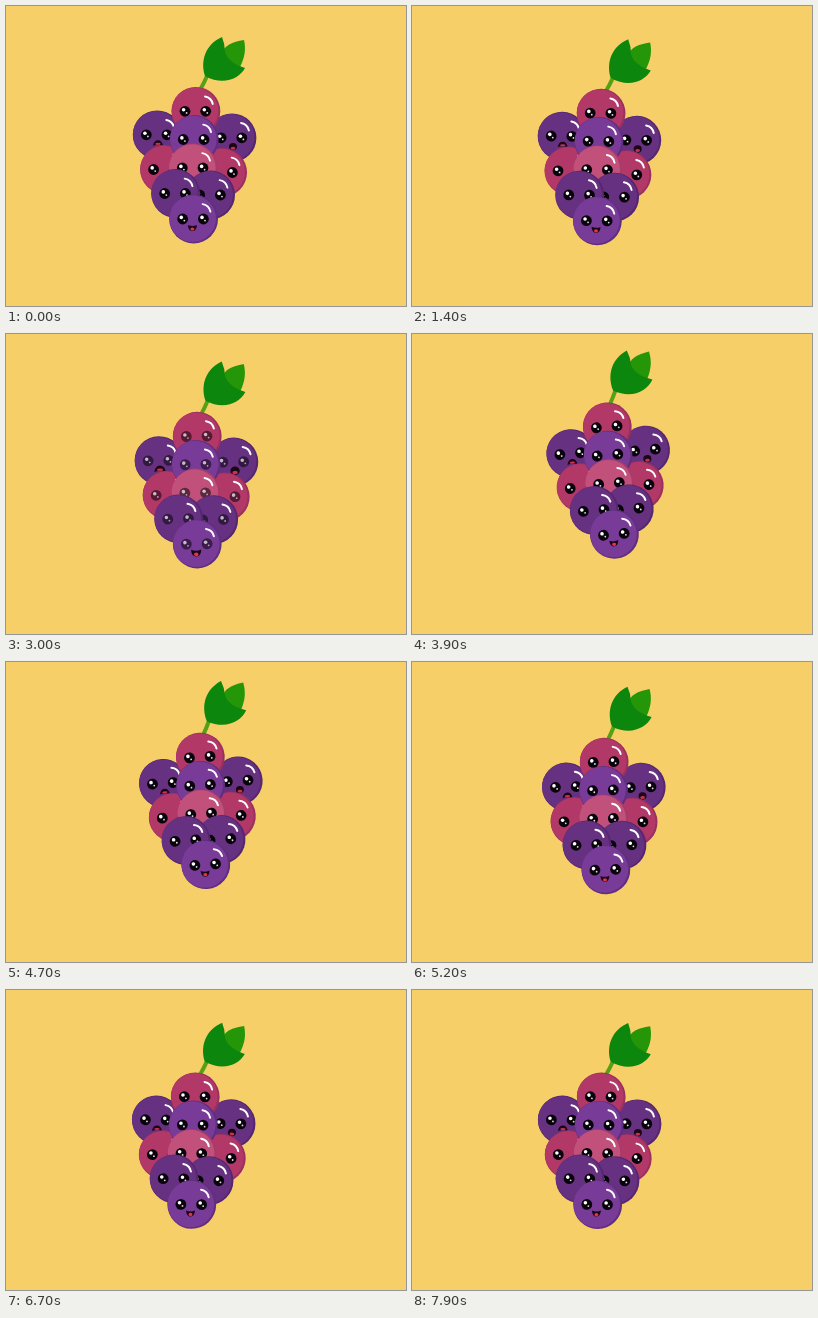
Animation of 400 by 300 pixels, one loop 8 s. Source, as an HTML page with a canvas:

```html
<!DOCTYPE html>
<html lang="en">
<head>
<meta charset="utf-8">
<title>Swinging grapes</title>
<style>
html, body { margin: 0; width: 100%; height: 100%; overflow: hidden; background: #f7cf68; }
canvas { display: block; }
</style>
</head>
<body>
<canvas id="stage" width="400" height="300"></canvas>
<script>
const ctx = document.getElementById('stage').getContext('2d');
const LOOP = 8000, STEP = 100, SWING = 6000;
const REST = 0.13; // swing amount at which the artwork is laid out
const PIVOT = [218, 45];
const RADIUS = 24.4;

// [time, swing amount], one period
const SWING_KEYS = [[0, .13], [650, .03], [1300, 0], [1900, .02], [2500, .13], [3000, .34],
  [3500, .76], [3900, .98], [4250, 1.04], [4700, .83], [5250, .46], [5800, .18], [6000, .13]];

const PINK = ['#b23867', '#99305f'];
const ROSE = ['#c1507a', '#a83c68'];
const PLUM = ['#673181', '#55276f'];
const VIOLET = ['#783b97', '#602e80'];

// x, y, colours, mouth; back to front
const GRAPES = [
  [151.2, 128.8, PLUM, 'sad'],
  [226, 131.8, PLUM, 'round'],
  [158.5, 163.5, PINK],
  [216.6, 166.5, PINK],
  [189.9, 105.3, PINK],
  [188.2, 133.5, VIOLET],
  [187.2, 162, ROSE],
  [204.6, 189, PLUM],
  [169.6, 187.5, PLUM],
  [187.6, 213, VIOLET, 'smile']
];
const MOUTH_AT = { sad: [0.8, 8.5], round: [1, 8.8], smile: [-1.2, 8] };

// Smooth curve through the keys
function swingAt(time) {
  const keys = SWING_KEYS, last = keys.length - 1;
  let i = 0;
  while (i < last - 1 && time >= keys[i + 1][0]) i++;
  const slope = k => {
    const a = keys[Math.max(0, k - 1)], b = keys[Math.min(last, k + 1)];
    return (b[1] - a[1]) / (b[0] - a[0]);
  };
  const [t0, v0] = keys[i], [t1, v1] = keys[i + 1];
  const span = t1 - t0, u = (time - t0) / span, ease = u * u * (3 - 2 * u);
  return v0 + (v1 - v0) * ease
    + span * u * (1 - u) * ((1 - u) * slope(i) - u * slope(i + 1));
}

function disc(x, y, r, color, ry = r) {
  ctx.fillStyle = color;
  ctx.beginPath();
  ctx.ellipse(x, y, r, ry, 0, 0, Math.PI * 2);
  ctx.fill();
}

function shape(path, color) {
  ctx.fillStyle = color;
  ctx.fill(new Path2D(path));
}

function eye(x, blink) {
  ctx.globalAlpha = 1 - 0.45 * blink;
  disc(x, 0, 5.4, '#09040c');
  ctx.globalAlpha = 1 - 0.3 * blink;
  disc(x - 1.4, -1.6, 1.8, '#fff');
  disc(x + 1.6, 1.6, 0.9, '#e6d8ea');
  ctx.globalAlpha = 1;
}

function mouth(kind, open) {
  ctx.save();
  ctx.translate(...MOUTH_AT[kind]);
  ctx.scale(open, open);
  if (kind === 'smile') {
    shape('M-4.5 -2 Q0 0 4.5 -2 Q4 4 0 4 Q-4 4 -4.5 -2Z', '#1a0614');
    disc(0, 2, 2, '#e0344a', 1.6);
  } else if (kind === 'sad') {
    shape('M-5 2.5 Q-4 -3 0 -3 Q4 -3 5 2.5 Q0 0.5 -5 2.5Z', '#1a0614');
    disc(0, 0.6, 2.7, '#c8304c', 1.1);
  } else {
    disc(0, 0, 4, '#1a0614', 3.7);
    disc(0, 1.6, 2.4, '#c8304c', 1.5);
  }
  ctx.restore();
}

function grape([x, y, [fill, shade], kind], blink) {
  ctx.save();
  ctx.translate(x, y);
  disc(0, 0, RADIUS, shade);
  disc(-0.9, -0.4, RADIUS - 1.1, fill);
  ctx.strokeStyle = '#fff';
  ctx.lineWidth = 2;
  ctx.lineCap = 'round';
  ctx.beginPath();
  ctx.arc(7.5, -5.5, 9.5, -1.4, -0.2);
  ctx.stroke();
  eye(-10.9, blink);
  eye(9.8, blink);
  if (kind) mouth(kind, 1 + 0.15 * blink);
  ctx.restore();
}

function leaf() {
  ctx.strokeStyle = '#55a014';
  ctx.lineWidth = 4;
  ctx.lineCap = 'butt';
  ctx.stroke(new Path2D('M193.5 85 Q198 77 202 68'));
  shape('M216 48 C218 39 226 36 238 34 C240 43 239 51 234 61 L220 60Z', '#259608');
  shape('M199 70 C194 54 200 38 216 31 Q219 38 219 46 C222 55 230 59 239 62 C233 73 217 80 199 70Z', '#0c860c');
}

function draw(now) {
  const time = Math.floor(now % LOOP / STEP) * STEP;
  const swing = swingAt(time % SWING) - REST;
  const blink = Math.max(0, 1 - Math.abs(time - 3000) / 200);
  ctx.fillStyle = '#f7cf68';
  ctx.fillRect(0, 0, 400, 300);
  ctx.save();
  ctx.translate(PIVOT[0], PIVOT[1] - 17.3 * swing);
  ctx.rotate(-0.103 * swing);
  ctx.translate(-PIVOT[0], -PIVOT[1]);
  leaf();
  GRAPES.forEach(g => grape(g, blink));
  ctx.restore();
}

const start = performance.now();
function tick() {
  draw(performance.now() - start);
  requestAnimationFrame(tick);
}
tick();
</script>
</body>
</html>
```
